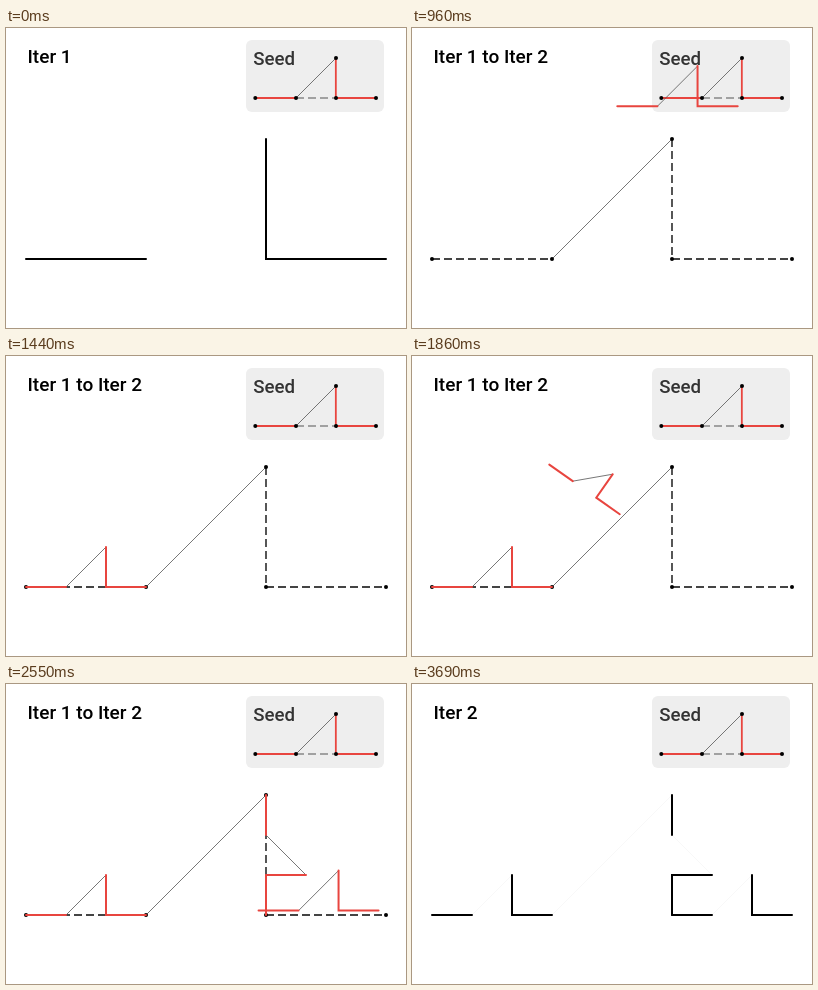
These frames come from a looping animation (400 px wide and 300 px high, 4.38 s). An HTML page:

```html
<!DOCTYPE html>
<html lang="en">
<head>
<meta charset="utf-8">
<title>Fractal iteration</title>
<style>
  html, body { margin: 0; width: 100%; height: 100%; overflow: hidden; background: #fff; }
  svg { display: block; width: 400px; height: 300px; }
  text { font: 500 19px Roboto, sans-serif; }
  path, line { fill: none; }
  .red { stroke: #e8453f; stroke-width: 2; stroke-linecap: round; }
  .solid { stroke: #000; stroke-width: 2; stroke-linecap: round; }
  .dash { stroke: #444; stroke-width: 1.8; stroke-dasharray: 8 4; }
  .thin { stroke: #555; stroke-width: .8; }
</style>
</head>
<body>
<svg id="stage" viewBox="0 0 400 300"></svg>
<script>
const LOOP = 4380;
const MOVE = { first: 856, period: 601, leg: 275 };
const RED = [232, 69, 63];

// Base segments [x1, y1, x2, y2]
const SEED = [249.5, 70, 370, 70];
const WAY = [51, 107, 171, 107];
const TARGETS = [[20, 231, 140, 231], [260, 111, 260, 231], [260, 231, 380, 231]];

const stage = document.getElementById('stage');

function add(parent, tag, attrs, text) {
  const el = document.createElementNS('http://www.w3.org/2000/svg', tag);
  for (const key in attrs) el.setAttribute(key, attrs[key]);
  if (text) el.textContent = text;
  return parent.appendChild(el);
}
const group = () => add(stage, 'g', {});
const stroke = (parent, cls, d = '') => add(parent, 'path', { class: cls, d });
const dot = (parent, x, y) => add(parent, 'circle', { cx: x, cy: y, r: 2 });
const show = (el, on) => { el.style.display = on ? '' : 'none'; };

const clamp = v => Math.min(1, Math.max(0, v));
const ease = v => v < .5 ? 4 * v ** 3 : 1 - 4 * (1 - v) ** 3;
const phase = (t, start, length) => ease(clamp((t - start) / length));
const mix = (a, b, k) => a.map((v, i) => v + (b[i] - v) * k);

// Seed motif laid along a base segment
function motif([x1, y1, x2, y2]) {
  const dx = (x2 - x1) / 3, dy = (y2 - y1) / 3;
  const at = (along, up) => `${x1 + dx * along + dy * up} ${y1 + dy * along - dx * up}`;
  return {
    lines: `M${at(0, 0)}L${at(1, 0)}M${at(2, 1)}L${at(2, 0)}L${at(3, 0)}`,
    slope: `M${at(1, 0)}L${at(2, 1)}`
  };
}

// Title and seed panel
const title = add(stage, 'text', { x: 21.5, y: 34.5 });
add(stage, 'rect', { x: 240, y: 12, width: 138, height: 72, rx: 6, fill: '#eee' });
add(stage, 'text', { x: 247.3, y: 37, fill: '#333', style: 'font-size:18.67px' }, 'Seed');
const panel = group();
stroke(panel, 'dash', 'M290 70H330').style.cssText = 'stroke:#888;stroke-width:1.5';
stroke(panel, 'thin', 'M290 70L330 30');
stroke(panel, 'red', motif(SEED).lines).style.strokeWidth = 1.8;
[[249.3, 70], [290, 70], [330, 30], [330, 70], [370, 70]].forEach(p => dot(panel, ...p));

// Curve being replaced
const start = stroke(stage, 'solid', motif([20, 231, 380, 231]).lines);
const slope = stroke(stage, 'thin', motif([20, 231, 380, 231]).slope);
const dashes = group();
TARGETS.forEach(([x1, y1, x2, y2]) => add(dashes, 'line', { class: 'dash', x1, y1, x2, y2 }));
const dots = group();
[[20, 231], [140, 231], [260, 111], [260, 231], [380, 231]].forEach(p => dot(dots, ...p));

// Copies of the seed that fly to each segment
const copies = TARGETS.map((target, i) => {
  const g = group();
  return {
    g, target,
    begin: MOVE.first + i * MOVE.period,
    slope: stroke(g, 'thin'),
    lines: stroke(g, 'red')
  };
});

function draw(t) {
  const label = t < 480 ? 'Iter 1' : t < 2730 ? 'Iter 1 to Iter 2' : 'Iter 2';
  if (title.textContent !== label) title.textContent = label;

  const open = t >= 600;
  show(start, !open);
  show(slope, open);
  show(dashes, open);
  show(dots, open && t < 2730);
  dashes.style.opacity = 1 - phase(t, 3030, 190);

  const settle = phase(t, 3510, 180);
  const fade = 1 - .95 * settle;
  const color = `rgb(${mix(RED, [0, 0, 0], settle).map(Math.round)})`;
  slope.style.opacity = fade;

  for (const c of copies) {
    show(c.g, t > c.begin);
    const out = phase(t, c.begin, MOVE.leg);
    const home = phase(t, c.begin + MOVE.leg, MOVE.leg);
    const m = motif(mix(mix(SEED, WAY, out), c.target, home));
    c.lines.setAttribute('d', m.lines);
    c.slope.setAttribute('d', m.slope);
    c.lines.style.stroke = color;
    c.slope.style.opacity = fade;
  }
}

const origin = performance.now();
function tick() {
  draw((performance.now() - origin) % LOOP);
  requestAnimationFrame(tick);
}
tick();
</script>
</body>
</html>
```
